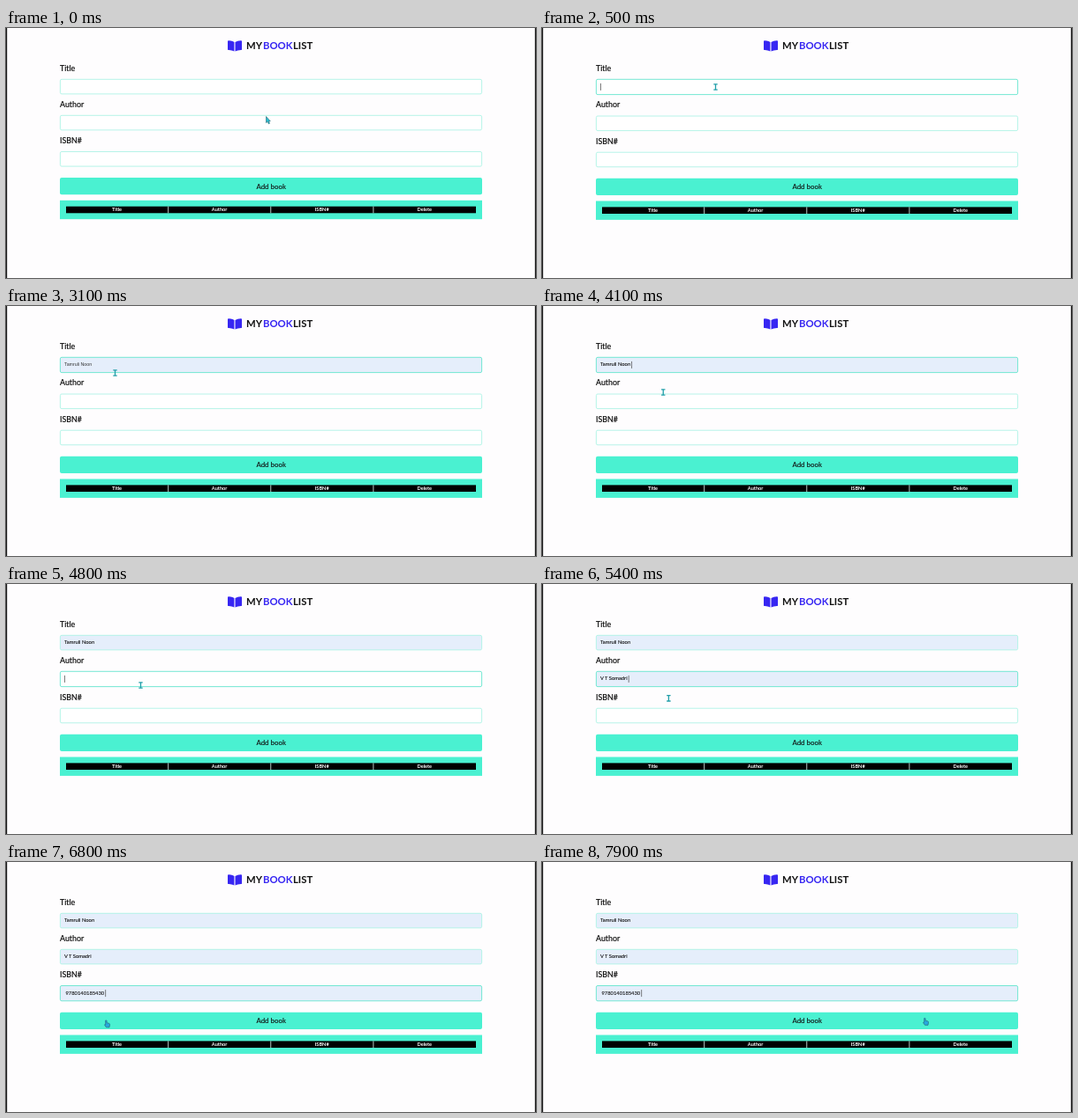
Animation of 600x284 px, one loop 8 s. Source, as an HTML page:

```html
<!DOCTYPE html>
<html lang="en">
<head>
<meta charset="utf-8">
<title>My Book List</title>
<style>
  html, body { margin: 0; width: 100%; height: 100%; overflow: hidden; background: #fefdfe; }
  svg { display: block; width: 100%; height: 100%; }
  text { font-family: Lato, sans-serif; fill: #111; white-space: pre; }
  .label { font-size: 8.8px; font-weight: 500; stroke: #111; stroke-width: .15px; }
  .head { font-size: 11.3px; font-weight: 700; }
  .button { font-size: 7.9px; text-anchor: middle; stroke: #111; stroke-width: .12px; }
  .cell { font-size: 5.6px; font-weight: 700; fill: #fff; text-anchor: middle; }
  .value { font-size: 5.8px; stroke: #111; stroke-width: .1px; }
  .preview { font-family: "Liberation Sans", Arial, sans-serif; font-size: 5.3px; stroke: none; fill: #333; }
</style>
</head>
<body>
<svg id="stage" viewBox="0 0 600 284" xmlns="http://www.w3.org/2000/svg"></svg>
<script>
const LOOP = 8000, STEP = 100, FOCUS_GROWTH = 0.7;
const TEAL = '#4af1d1', PALE = '#aef3e6', RING = '#66e6cf', FILLED = '#e5eefb', INDIGO = '#3726f2';

// focus: when the field is active; preview/commit: when its value appears
const fields = [
  { label: 'Title',  top: 58,    x: 66,   text: 'Tamruli Noon',  focus: [500, 4400],  preview: 2400, commit: 3900 },
  { label: 'Author', top: 99,    x: 66,   text: 'V T Somadri',   focus: [4400, 5700], preview: 4900, commit: 5200 },
  { label: 'ISBN#',  top: 140.2, x: 67.5, text: '9780140185430', focus: [5700, LOOP], preview: 6300, commit: 6800 }
];
const caretOff = [[1000, 1600], [2100, 2500], [3100, 3600], [7300, 7800]];

// time, x, y
const path = [
  [0, 294.5, 100.5], [100, 196.5, 67], [2000, 196.5, 67], [2500, 123.5, 76],
  [3500, 123.5, 76], [3700, 122, 87], [3800, 122, 87], [4400, 152.5, 109],
  [4700, 152.5, 109], [4800, 152.5, 115], [4900, 150, 125], [5300, 150, 125],
  [5800, 117, 149], [6100, 117, 149], [6400, 113, 158], [6700, 113, 158],
  [6800, 114.5, 184], [6900, 114.5, 184], [7800, 461, 181.5], [7900, 434.5, 181.5]
];
const pointers = [[0, 'arrow'], [100, 'beam'], [6800, 'hand']];

const stage = document.getElementById('stage');
const find = id => document.getElementById(id);
const rect = (x, y, w, h, fill, more = '') =>
  `<rect x="${x}" y="${y}" width="${w}" height="${h}" fill="${fill}" ${more}/>`;
const text = (cls, x, y, body, more = '') =>
  `<text class="${cls}" x="${x}" y="${y}" ${more}>${body}</text>`;

function fieldMarkup(f, i) {
  return `<g id="field${i}">
    ${text('label', 61, f.top - 9.3, f.label)}
    ${rect(61.4, f.top + .3, 477.2, 16.6, '#fff', `id="box${i}" rx="1.6" stroke-width=".9"`)}
    ${text('value', f.x, f.top + 10.3, f.text, `id="value${i}"`)}
  </g>`;
}

function tableMarkup() {
  const names = ['Title', 'Author', 'ISBN#', 'Delete'];
  const cells = names.map((name, i) =>
    (i ? rect(67.2 + i * 116.1, 202.7, .8, 7.6, '#dffaf4') : '') +
    text('cell', 125.5 + i * 116.1, 208.4, name)).join('');
  return rect(61, 195.8, 478, 21.4, TEAL) + rect(68, 202.7, 464, 7.6, '#000') + cells;
}

stage.innerHTML = `
  ${rect(0, 0, 600, 284, '#fefdfe')}
  ${rect(0, 0, 1.2, 284, '#111')}
  ${rect(598.8, 0, 1.2, 284, '#111')}
  <path fill="${INDIGO}" d="M251 15.2Q251 14.3 252 14.3Q256 14.4 258.4 15.9V26.6Q255.8 25.2 252 25.1Q251 25 251 24.2Z
    M267 15.2Q267 14.3 266 14.3Q262 14.4 259.5 15.9V26.6Q262.2 25.2 266 25.1Q267 25 267 24.2Z"/>
  ${text('head', 272, 24, 'MY')}
  ${text('head', 291, 24, 'BOOK', `style="fill:${INDIGO}"`)}
  ${text('head', 325, 24, 'LIST')}
  ${fields.map(fieldMarkup).join('')}
  <g id="footer">
    ${rect(61, 170, 478, 19.2, TEAL, 'rx="2"')}
    ${text('button', 300.2, 182.5, 'Add book')}
    ${tableMarkup()}
  </g>
  ${rect(0, 0, .7, 8, '#444', 'id="caret"')}
  <g id="pointer">
    <path id="arrow" d="M0 0V7.2L1.6 5.8L2.8 8.4L4 7.8L2.8 5.4H4.8Z" fill="#25bfd2" stroke="#28636f" stroke-width=".6"/>
    <path id="beam" d="M-2.2-3.2H2.2M-2.2 3.2H2.2M0-3.2V3.2" fill="none" stroke="#219fa9" stroke-width="1.3"/>
    <path id="hand" d="M-1.8-4Q-.9-4.6-.4-3.6V-1.3L2.4-.6Q3.2-.2 3 .8L2.5 3.8H-1L-3 1Q-2.7 0-1.8.6Z" fill="#28a9df" stroke="#24677f" stroke-width=".7"/>
  </g>`;

const within = (t, [from, to]) => t >= from && t < to;
const shift = (id, y) => find(id).setAttribute('transform', `translate(0 ${y})`);

function place(t) {
  const next = path.findIndex(p => p[0] > t);
  if (next < 0) return path[path.length - 1].slice(1);
  const [t0, x0, y0] = path[next - 1], [t1, x1, y1] = path[next];
  const k = (t - t0) / (t1 - t0);
  // the first hop is a jump
  return t0 === 0 ? [x0, y0] : [x0 + (x1 - x0) * k, y0 + (y1 - y0) * k];
}

function render(t) {
  let drop = 0;
  find('caret').style.display = 'none';

  fields.forEach((f, i) => {
    const box = find('box' + i), value = find('value' + i);
    const active = within(t, f.focus), shown = t >= f.preview, done = t >= f.commit;
    shift('field' + i, drop);
    box.setAttribute('fill', shown ? FILLED : '#fff');
    box.setAttribute('stroke', active ? RING : PALE);
    box.setAttribute('height', 16.6 + (active ? FOCUS_GROWTH : 0));
    value.style.display = shown ? '' : 'none';
    value.setAttribute('class', done ? 'value' : 'value preview');

    if (active && !caretOff.some(span => within(t, span))) {
      const caret = find('caret');
      caret.style.display = '';
      caret.setAttribute('x', done ? f.x + value.getComputedTextLength() + 1.2 : 66.2);
      caret.setAttribute('y', f.top + 4.9);
    }
    if (active) drop = FOCUS_GROWTH;
  });
  shift('footer', drop);

  const kind = pointers.filter(p => p[0] <= t).pop()[1];
  for (const [, name] of pointers) find(name).style.display = name === kind ? '' : 'none';
  find('pointer').setAttribute('transform', `translate(${place(t).join(' ')})`);
}

const start = performance.now();
function tick() {
  const t = (performance.now() - start) % LOOP;
  render(Math.floor(t / STEP) * STEP);
  requestAnimationFrame(tick);
}
tick();
</script>
</body>
</html>
```
